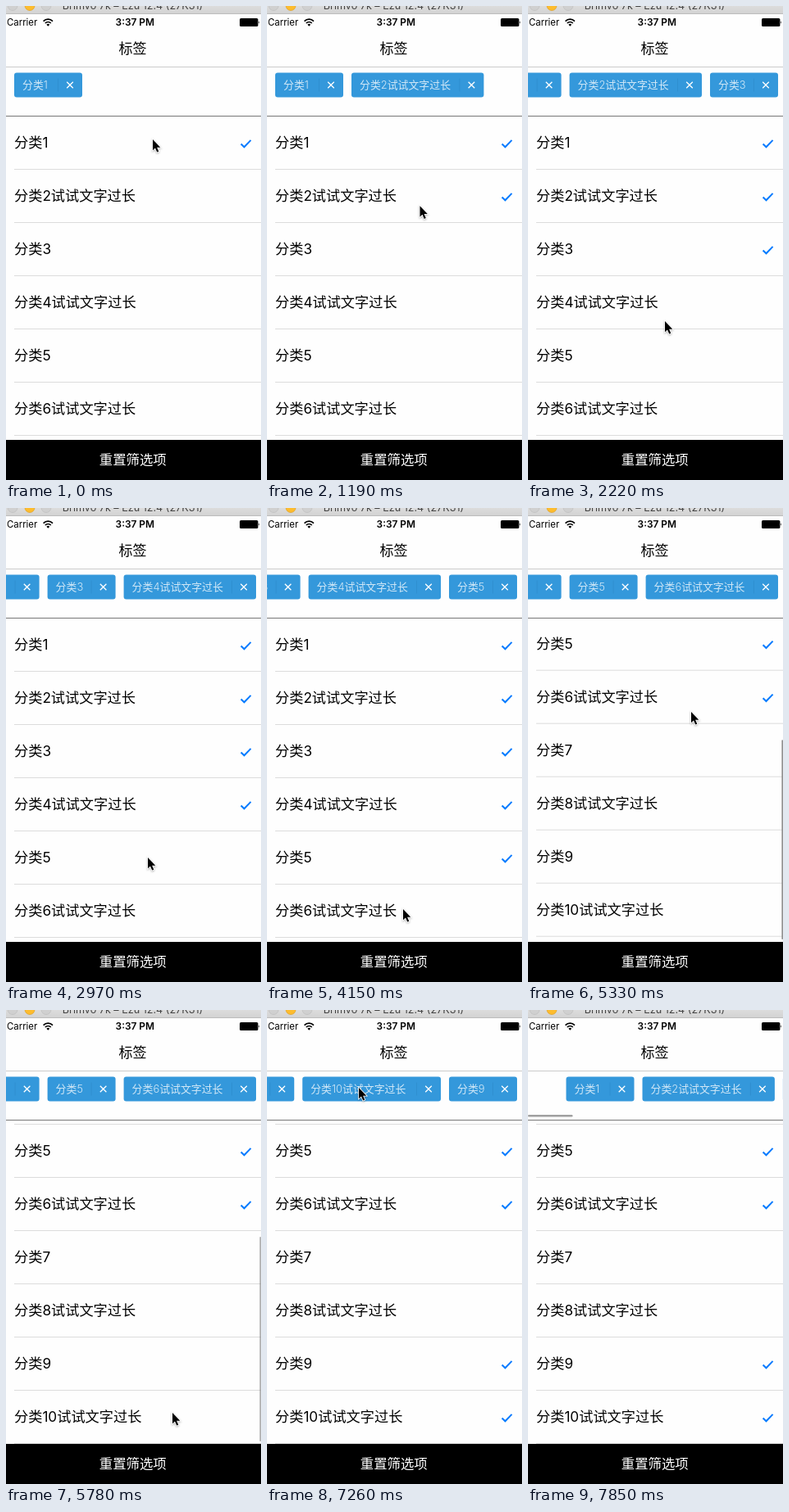
Write an HTML page that moves like this. It is 311 by 579 pixels and loops after 8 s.

```html
<!DOCTYPE html>
<html lang="zh-CN">
<head>
<meta charset="utf-8">
<title>标签</title>
<style>
  html, body { margin: 0; height: 100%; overflow: hidden; background: #fefefe; }
  svg { display: block; width: 100vw; height: 100vh; }
  text { font-family: Inter, "Noto Sans CJK SC", "Noto Sans CJK", sans-serif; }
  .row text { font-size: 17.2px; }
  .row line { stroke: #dcdcdc; }
  .check { fill: none; stroke: #007aff; stroke-width: 2; }
  .tag rect { fill: #3498db; }
  .tag text { fill: #fff; fill-opacity: .78; font-size: 12.9px; font-weight: 300; }
  .tag .divider { stroke: #2f8fd0; }
  .tag .close { stroke: #fff; stroke-width: 1.3; }
  .middle { text-anchor: middle; }
</style>
</head>
<body>
<svg viewBox="0 0 311 579" preserveAspectRatio="none">
  <defs>
    <clipPath id="listClip"><rect y="135" width="311" height="395"/></clipPath>
    <linearGradient id="chrome" x2="0" y2="1">
      <stop stop-color="#dcdcdc"/><stop offset="1" stop-color="#d2d2d2"/>
    </linearGradient>
  </defs>
  <rect width="311" height="579" fill="#fefefe"/>

  <g clip-path="url(#listClip)">
    <g id="rows"></g>
    <rect id="listBar" x="309.4" width="1.6" rx=".8" fill="#8e8e8e"/>
  </g>

  <g id="tags"></g>
  <rect id="tagBar" y="128" height="2.6" rx="1.3" fill="#a0a0a0"/>
  <path d="M0 74.5H311" stroke="#cbcbcb"/>
  <path d="M0 134.5H311" stroke="#777"/>

  <rect width="311" height="10" fill="url(#chrome)"/>
  <path d="M0 9.5H311" stroke="#bcbcbc"/>
  <g stroke-width=".7">
    <circle cx="8" cy="-.5" r="6" fill="#d0d0d0" stroke="#bdbdbd"/>
    <circle cx="29" cy="-.5" r="6" fill="#fdbc2e" stroke="#dfa023"/>
    <circle cx="49" cy="-.5" r="6" fill="#d0d0d0" stroke="#bdbdbd"/>
  </g>
  <text class="middle" x="154.5" y="4" font-size="12.6" fill="#444">Brimvo 7k – Ezu 12.4 (27K31)</text>

  <text x="1" y="24.3" font-size="11.4">Carrier</text>
  <g fill="none" stroke="#000" stroke-width="1.7">
    <path d="M45.6 18.6a8 8 0 0 1 11.4 0M47.8 21a5 5 0 0 1 7 0"/>
    <path d="M51.3 24.8l-1.9-2a2.7 2.7 0 0 1 3.8 0z" fill="#000" stroke="none"/>
  </g>
  <text class="middle" x="157.3" y="24.3" font-size="11.9" font-weight="600">3:37 PM</text>
  <rect x="285" y="15" width="22.4" height="10" rx="1.5"/>
  <path d="M308.2 18.3q1.6 1.7 0 3.4z"/>
  <text class="middle" x="154.5" y="58.2" font-size="17" font-weight="500">标签</text>

  <rect y="530" width="311" height="49"/>
  <text class="middle" x="154.8" y="560" font-size="16.4" fill="#fff">重置筛选项</text>

  <path id="cursor" d="M0 0V13.2L3 10.5 5.2 15.6 7.3 14.7 5.1 9.7H9.3Z"
        stroke="#fff" stroke-width="1.6" paint-order="stroke"
        style="filter: drop-shadow(0 1px 1px rgba(0,0,0,.3))"/>
</svg>
<script>
const LOOP = 8000, STEPS = 54;
const byId = id => document.getElementById(id);
const numbers = Array.from({ length: 10 }, (_, i) => i + 1);

// Tags in the order they are picked: category number and step
const picks = [[1, 0], [2, 7], [3, 11], [4, 17], [5, 23], [6, 30], [10, 40], [9, 42]];

// Pointer stops: arrival step, x, y
const stops = [
  [0, 179, 163], [4, 186, 228], [10, 188, 291], [15, 167, 385], [20, 173, 427], [28, 166, 490],
  [34, 199, 249], [39, 203, 492], [41, 203, 430], [45, 150, 127], [49, 112, 95], [52, 330, 97]
];

// Smooth progress from 0 to 1 between two steps
function ease(step, start, end) {
  const p = Math.min(1, Math.max(0, (step - start) / (end - start)));
  return p * p * (3 - 2 * p);
}

// Each stop is reached by a glide of at most three steps
function pointerAt(step) {
  let [left, x, y] = stops[0];
  for (const [arrive, toX, toY] of stops.slice(1)) {
    const p = ease(step, Math.max(left, arrive - 3), arrive);
    x += (toX - x) * p;
    y += (toY - y) * p;
    left = arrive;
  }
  return [x, y];
}

const label = n => `分类${n}${n % 2 ? "" : "试试文字过长"}`;
const tagWidth = n => n % 2 ? 83 : n < 10 ? 161.4 : 168.8;

let edge = 0;
const tags = picks.map(([n, step]) => {
  const x = edge + 10;
  edge = x + tagWidth(n);
  return { n, step, x, end: edge };
});

byId("rows").innerHTML = numbers.map(n => `
  <g class="row" transform="translate(0 ${70 + 65 * n})">
    <text x="10" y="38.3">${label(n)}</text>
    <path class="check" id="check${n}" d="M286.6 33.5l3.9 3.8 8.1-8.4"/>
    <line x1="10" x2="311" y1="64.5" y2="64.5"/>
  </g>`).join("");

byId("tags").innerHTML = tags.map(({ n, x }) => {
  const w = tagWidth(n);
  return `<g class="tag" id="tag${n}" transform="translate(${x} 81.5)">
    <rect width="${w}" height="30" rx="3"/>
    <text x="10" y="19.8">${label(n)}</text>
    <path class="divider" d="M${w - 29.5} 7V23"/>
    <path class="close" d="M${w - 18.8} 11.2l7.6 7.6m0-7.6l-7.6 7.6"/>
  </g>`;
}).join("");

const show = (id, visible) => byId(id).style.display = visible ? "" : "none";
const move = (id, x, y) => byId(id).setAttribute("transform", `translate(${x} ${y})`);

function setAttributes(id, values) {
  for (const name in values) byId(id).setAttribute(name, values[name]);
}

function drawTags(step) {
  const picked = tags.filter(tag => tag.step <= step);
  const isPicked = n => picked.some(tag => tag.n === n);
  numbers.forEach(n => show("check" + n, isPicked(n)));
  tags.forEach(({ n }) => show("tag" + n, isPicked(n)));

  // The newest tag stays in view until the strip is swiped back past its start
  const newest = Math.max(0, picked[picked.length - 1].end - 305);
  const offset = newest - (newest + 36.5) * ease(step, 49, 53);
  move("tags", -offset, 0);
  show("tagBar", step > 49);
  setAttributes("tagBar", { x: Math.max(0, offset * .288), width: 91 + Math.min(0, offset) });
}

function drawList(step) {
  // Drag beyond the end, then spring back
  const end = 255, over = 24.3;
  const offset = (end + over) * ease(step, 30, 34) - over * ease(step, 34, 37);
  const excess = Math.max(0, offset - end);
  move("rows", 0, -offset);
  setAttributes("listBar", {
    y: 137 + 140 * Math.min(1, offset / end) + excess,
    height: 250 - excess,
    opacity: ease(step, 30, 31) - ease(step, 38, 41)
  });
}

let shown = -1;
function tick() {
  const time = performance.now() % LOOP;
  const step = Math.min(STEPS - 1, Math.floor((time + 9) * STEPS / LOOP));
  if (step !== shown) {
    shown = step;
    drawTags(step);
    drawList(step);
    move("cursor", ...pointerAt(step));
  }
  requestAnimationFrame(tick);
}
tick();
</script>
</body>
</html>
```
